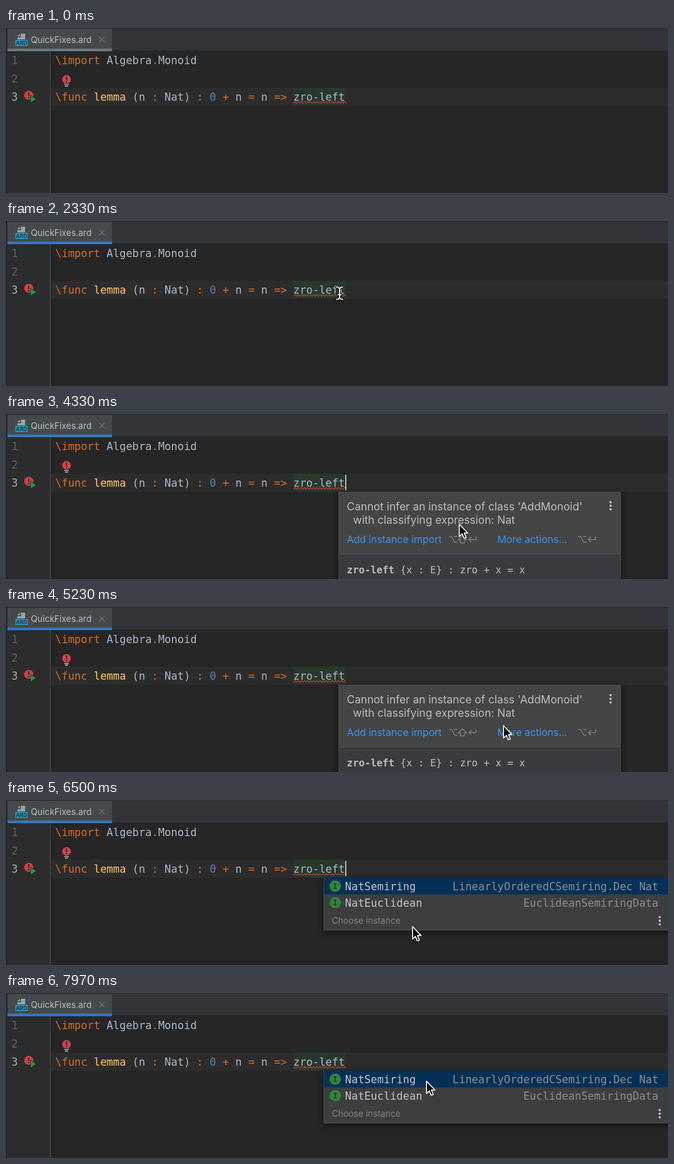
An HTML page for the animation above (8000 ms loop, 1280 by 320 pixels).

```html
<!DOCTYPE html>
<html lang="en">
<head>
<meta charset="utf-8">
<title>Quick fixes</title>
<style>
  html, body { margin: 0; width: 100%; height: 100%; overflow: hidden; background: #262626; }
  svg { display: block; width: 1280px; height: 320px; }
  text { white-space: pre; }
  .code { font: 20.68px "DejaVu Sans Mono", monospace; fill: #a9b7c6; }
  .ui { font-family: Inter, sans-serif; }
  .kw { fill: #d46c1e; }
  .name { fill: #ffc66d; }
  .num { fill: #5682ac; }
  .line { fill: #5e6164; }
  .link { font-size: 19.3px; fill: #3f93f3; }
  .keys { fill: none; stroke: #85898a; stroke-width: 1.5; }
  .item { fill: #c2c5c8; }
  .dim { fill: #8b8d8f; }
  .doc { font-size: 19.1px; fill: #b9bbbd; }
  .shadow { filter: drop-shadow(0 4px 6px #0009); }
</style>
</head>
<body>
<svg viewBox="0 0 1280 320">
  <defs>
    <path id="option" d="M0 2h5l6 11h5M9 2h7"/>
    <path id="shift" d="M8 0l8 8h-4v6H4V8H0z"/>
    <path id="enter" d="M15 2v6H1M6 3L1 8l5 5"/>
    <path id="beamShape" d="M-6-12Q-1-12 0-8Q1-12 6-12M0-8V8M-6 12Q-1 12 0 8Q1 12 6 12M-3 3H3"/>
    <g id="dots" fill="#c3c5c6"><circle cy="-7" r="2.2"/><circle r="2.2"/><circle cy="7" r="2.2"/></g>
  </defs>

  <!-- editor -->
  <rect width="1280" height="320" fill="#262626"/>
  <rect y="44" width="85" height="276" fill="#2a2c2e"/>
  <rect y="116" width="1280" height="35" fill="#2c2c2c"/>
  <path d="M85.5 44V320" stroke="#55585a"/>
  <rect width="1280" height="44" fill="#323437"/>
  <path d="M0 43.5H1280M0 .5H1280" stroke="#292a2b"/>
  <path d="M1 0V320" stroke="#222324" stroke-width="2"/>

  <!-- tab -->
  <rect x="3" y="2" width="202" height="39" fill="#45494b"/>
  <rect id="tabLine" x="3" y="40" width="202" height="5"/>
  <path d="M29 11h8v11H22v-4h7z" fill="#9aa4aa"/>
  <path d="M22 16l5-5v5z" fill="#9aa4aa"/>
  <rect x="18" y="23" width="24" height="12" fill="#2a94b8"/>
  <text class="ui" x="30" y="33.3" font-size="10.5" font-weight="600" text-anchor="middle" fill="#17333d">ARD</text>
  <text class="ui" x="48" y="28.5" font-size="16.8" fill="#bcbec0">QuickFixes.ard</text>
  <path d="M180.500 17.500l10 10m0-10l-10 10" stroke="#74787a" stroke-width="1.4"/>

  <!-- code -->
  <rect x="556" y="116" width="100" height="34" fill="#29382d"/>
  <g class="code">
    <text class="line" x="10.500" y="70.300">1</text>
    <text class="line" x="10.500" y="105.500">2</text>
    <text x="10.500" y="140.600" fill="#a8aaac">3</text>
    <text x="95" y="70.300"><tspan class="kw">\import</tspan> Algebra<tspan class="kw">.</tspan>Monoid</text>
    <text x="95" y="140.600"><tspan class="kw">\func</tspan> <tspan class="name">lemma</tspan> (n <tspan class="kw">:</tspan> Nat) <tspan class="kw">:</tspan> <tspan class="num">0</tspan> <tspan class="kw">+</tspan> n <tspan class="kw">=</tspan> n <tspan class="kw">=&gt;</tspan> zro-left</text>
  </g>
  <path id="squiggle" fill="none" stroke="#b53d3a" stroke-width="1.4"/>

  <!-- gutter mark and bulb -->
  <circle cx="44" cy="130.500" r="8.800" fill="#d04046"/>
  <path d="M44 125v6.500M44 134v2.500" stroke="#2a2020" stroke-width="2.600"/>
  <path d="M47.500 130.500V145L58.500 137.700z" fill="#189c45" stroke="#2c2c2c"/>
  <g id="bulb">
    <circle cx="117" cy="99.500" r="8.300" fill="#d5414a"/>
    <path d="M117 94v6.500M117 102.500v2.500" stroke="#2a2020" stroke-width="2.600"/>
    <path d="M112.500 109.500h9M114 112.700h6" stroke="#c5c7c8" stroke-width="1.700"/>
  </g>
  <rect id="caret" x="656" y="118" width="2" height="30" fill="#d0d0d0"/>

  <!-- error popup -->
  <g id="errorPopup">
    <rect class="shadow" x="643" y="151" width="546" height="180" fill="#434645"/>
    <rect x="643" y="271" width="546" height="60" fill="#393b3e"/>
    <path d="M643 271.500h546" stroke="#525557"/>
    <path d="M643.500 320V151.500h545V320" fill="none" stroke="#505354"/>
    <g class="ui" font-size="20.95" fill="#bcbebe">
      <text x="659" y="187">Cannot infer an instance of class 'AddMonoid'</text>
      <text x="671" y="213">with classifying expression: Nat</text>
      <text class="link" x="659" y="250">Add instance import</text>
      <text class="link" x="950" y="250">More actions...</text>
    </g>
    <path id="underline" d="M660 252.500H838" stroke="#3f93f3" stroke-width="1.500"/>
    <g class="keys">
      <use href="#option" x="856.500" y="235.500"/>
      <use href="#shift" x="874.500" y="236"/>
      <use href="#enter" x="894" y="235.500"/>
      <use href="#option" x="1106" y="235.500"/>
      <use href="#enter" x="1125" y="235.500"/>
    </g>
    <use href="#dots" x="1169" y="178"/>
    <text class="code doc" x="659" y="308.500"><tspan font-weight="700">zro-left</tspan> {x : E} : zro + x = x</text>
  </g>

  <!-- instance chooser -->
  <g id="chooser">
    <rect class="shadow" x="614" y="150" width="680" height="102" fill="#3c3e40"/>
    <rect x="614" y="150" width="680" height="33" fill="#043056"/>
    <path d="M614.500 150V252.500H1280" fill="none" stroke="#4b4d4f"/>
    <g fill="#30843a">
      <circle cx="636.500" cy="167" r="11"/>
      <circle cx="636.500" cy="199" r="11"/>
    </g>
    <path d="M633.500 162.500h6m-3 0v9m-3 0h6M633.500 194.500h6m-3 0v9m-3 0h6" stroke="#1d2b20" stroke-width="1.500" fill="none"/>
    <g class="code">
      <text class="item" x="655.500" y="174.500">NatSemiring</text>
      <text class="item" x="655.500" y="206.500">NatEuclidean</text>
      <g text-anchor="end">
        <text class="dim" x="1261.500" y="174.500">LinearlyOrderedCSemiring.Dec Nat</text>
        <text class="dim" x="1261.500" y="206.500">EuclideanSemiringData</text>
      </g>
    </g>
    <text class="ui" x="630" y="240" font-size="16.8" fill="#7f8183">Choose instance</text>
    <use href="#dots" x="1264" y="234"/>
  </g>

  <!-- pointers, hot spot at 0,0 -->
  <g id="pointer">
    <g id="beam" fill="none" stroke-linecap="round">
      <use href="#beamShape" stroke="#111" stroke-width="5"/>
      <use href="#beamShape" stroke="#fff" stroke-width="2.200"/>
    </g>
    <path id="arrow" d="M1 1V25L6.500 19.800 10.300 28.500 14.300 26.800 10.500 18.200H17.500z" fill="#050505" stroke="#fff" stroke-width="1.900" stroke-linejoin="round"/>
    <path id="hand" d="M-2 2Q-2 0 0 0T2.500 2L4 9Q5 7 7 9Q9 7.500 10.500 9.500Q13 8.500 14 11.500L15 17Q15 20 13 22V25H2.500V23L-4.500 15Q-6.500 12-4.500 11.500Q-3 11 0 14z M5.500 15v5M8.500 15v5M11.500 15v5" fill="#fff" stroke="#111" stroke-width="1.400" stroke-linejoin="round"/>
  </g>
</svg>
<script>
  const LOOP = 8000, CLICK = 1480, HOVER = 2730, CHOOSE = 6250, BLINK = 510;
  const blinkStarts = [CLICK, 3290, 6430];
  const path = [
    [830, 725, 297], [1330, 685, 137], [1620, 685, 137], [1760, 693, 145],
    [2230, 645, 140], [3330, 645, 140], [4110, 1028, 222], [4540, 735, 204],
    [5030, 1028, 222], [5600, 793, 247], [6300, 793, 247], [6650, 780, 243],
    [7050, 780, 242], [7500, 812, 180], [7750, 812, 170]
  ];
  const $ = id => document.getElementById(id);
  const show = (id, on) => $(id).style.display = on ? '' : 'none';
  const smooth = u => u * u * (3 - 2 * u);

  $('squiggle').setAttribute('d', 'M556 146' + 'l3-3.500 3 3.500'.repeat(17));

  function pointerAt(t) {
    const next = path.findIndex(p => p[0] > t);
    if (next < 0) return path[path.length - 1].slice(1);
    if (next === 0) return path[0].slice(1);
    const [t0, x0, y0] = path[next - 1], [t1, x1, y1] = path[next];
    const u = smooth((t - t0) / (t1 - t0));
    return [x0 + (x1 - x0) * u, y0 + (y1 - y0) * u];
  }

  function caretOn(t) {
    const start = blinkStarts.filter(s => s <= t).pop();
    return start !== undefined && Math.floor((t - start) / BLINK) % 2 === 0;
  }

  function draw(t) {
    const [x, y] = pointerAt(t);
    const popup = t >= HOVER && t < CHOOSE;
    const onLink = popup && x > 659 && x < 842 && y > 234;
    const onPanel = t > 3330 && y > 151;

    $('tabLine').setAttribute('fill', t < CLICK ? '#6d7a7f' : '#3478c2');
    show('bulb', t < CLICK || t > 2550);
    show('caret', caretOn(t));
    show('errorPopup', popup);
    show('underline', onLink);
    show('chooser', t >= 6350);
    show('pointer', t >= 830);
    show('hand', onLink);
    show('arrow', onPanel && !onLink);
    show('beam', !onPanel);
    $('pointer').setAttribute('transform', `translate(${x} ${y})`);
  }

  function frame() {
    draw(performance.now() % LOOP);
    requestAnimationFrame(frame);
  }
  frame();
</script>
</body>
</html>
```
